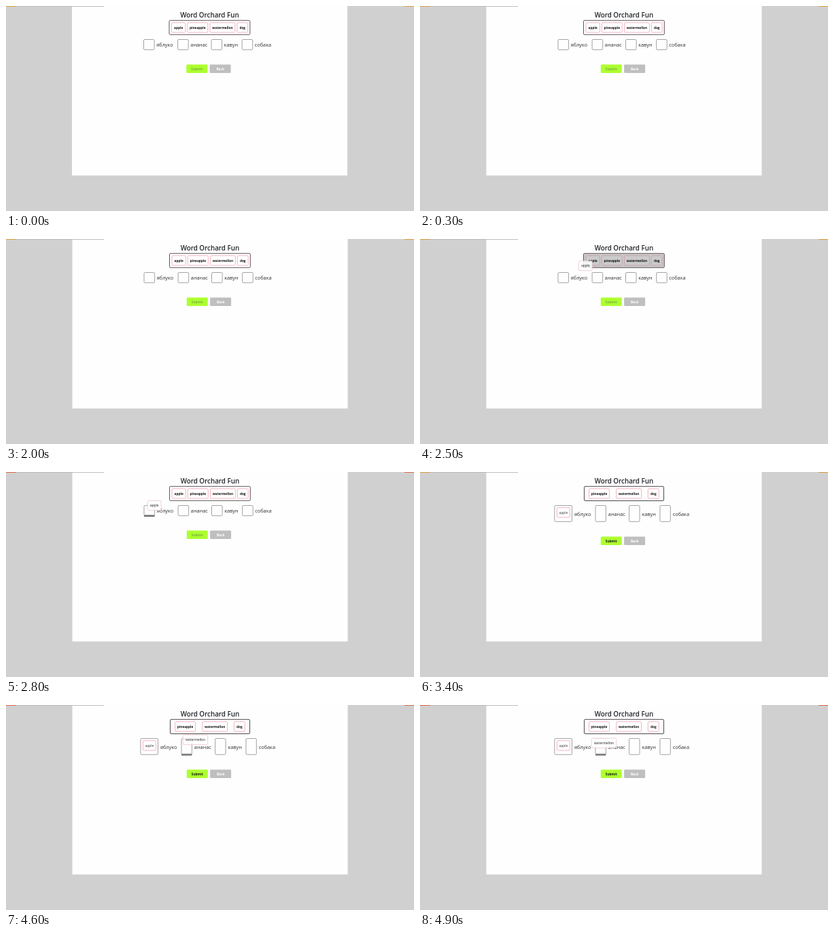
An HTML page with a canvas that plays this animation: 600x303 px, repeating every 5000 ms.

```html
<!DOCTYPE html>
<html lang="uk">
<head>
<meta charset="utf-8">
<title>Word matching</title>
<style>
html, body { margin: 0; width: 100%; height: 100%; overflow: hidden; background: #d0d0d0; }
canvas { display: block; }
</style>
</head>
<body>
<canvas id="stage" width="600" height="303"></canvas>
<script>
const ctx = document.getElementById('stage').getContext('2d');
const LOOP = 5000;
const STEP = 100;
const FONT = '"Open Sans", "Noto Sans", sans-serif';
const PINK = '#eea3b1';
const WORDS = ['яблуко', 'ананас', 'кавун', 'собака'];

function box(x, y, w, h, fill, stroke, radius = 1.5, line = 0.8) {
  ctx.beginPath();
  ctx.roundRect(x, y, w, h, radius);
  if (fill) {
    ctx.fillStyle = fill;
    ctx.fill();
  }
  if (stroke) {
    ctx.strokeStyle = stroke;
    ctx.lineWidth = line;
    ctx.stroke();
  }
}

function rect(x, y, w, h, color) {
  ctx.fillStyle = color;
  ctx.fillRect(x, y, w, h);
}

function text(str, x, y, size, weight, color, align = 'left') {
  ctx.font = `${weight} ${size}px ${FONT}`;
  ctx.textAlign = align;
  ctx.fillStyle = color;
  ctx.fillText(str, x, y);
}

function tag(word, x, y, w, { fill = '#fff', color = '#151515', weight = 700, border = PINK } = {}) {
  box(x, y, w, 14.3, fill, border);
  text(word, x + w / 2, y + 8.9, 4.75, weight, color, 'center');
}

function ghost(word, x, y, w) {
  ctx.globalAlpha = 0.82;
  tag(word, x, y, w, { color: '#2c2c2c', weight: 600, border: '#e3b9c0' });
  ctx.globalAlpha = 1;
}

function slot(x, w, h, hover) {
  box(x, 49.5, w, h, '#fefefe', '#8c8c8c', 1.5);
  if (hover) {
    rect(x + 0.5, 47.5 + h, w - 1, 1.5, '#c8c8c8');
    rect(x, 49 + h, w, 1.7, '#555');
  }
}

function button(label, x, y, fill, color) {
  box(x, y, 31, 12.5, fill, null, 1.3);
  text(label, x + 15.5, y + 8.1, 4.75, 700, color, 'center');
}

function buttons(dx, y, submitColor) {
  button('Submit', 265.3 + dx, y, '#adff2f', submitColor);
  button('Back', 299.6 + dx, y, '#bfbfbf', '#fff');
}

// Fraction of the drag path covered, fast at first
function glide(t, start, length) {
  const u = Math.min(1, Math.max(0, (t - start) / length));
  return 1 - (1 - u) ** 2;
}

function page(dx, alert) {
  rect(0, 0, 600, 303, '#d0d0d0');
  rect(97 + dx, 0, 405, 250.5, '#fefefe');
  rect(15, 0, 129, 1, '#bdbdbd');
  const accent = alert ? '#df6a42' : '#dfa040';
  rect(0, 0, 15, 1, accent);
  rect(586, 0, 14, 1, accent);
  text('Word Orchard Fun', 299.4 + dx, 16.7, 9.8, 600, '#212529', 'center');
}

function before(t, dx) {
  const dragging = t >= 2500;
  const p = glide(t, 2500, 500);
  const lifted = dragging && p === 0;
  ctx.save();
  ctx.translate(dx, 0);
  box(240, 21.3, 118.8, 21, lifted ? '#c9c9c9' : '#fefefe', '#615458', 1.5, 1);
  const style = lifted ? { fill: '#cbcbcb', border: '#c99ba4' } : {};
  tag('apple', 243.5, 24.7, 20.3, style);
  tag('pineapple', 266.8, 24.7, 30, style);
  tag('watermellon', 300, 24.7, 36.8, style);
  tag('dog', 339.8, 24.7, 15.8, style);
  [202.5, 252.6, 302, 347.1].forEach((x, i) => {
    slot(x, 15.6, 15.2, i === 0 && dragging && p > 0.6);
    text(WORDS[i], x + 18.7, 60.2, 7.35, 400, '#2b2f33');
  });
  buttons(0, 86.5, '#78b13a');
  ctx.restore();
  if (dragging) ghost('apple', 233.3 - 30 * p, 32.3 + 12 * p, 20);
}

function after(t) {
  const dragging = t >= 4300;
  const p = glide(t, 4300, 600);
  const lifted = dragging && p === 0;
  box(241.5, 21.3, 117, 21.2, '#fefefe', '#4f4a4c', 1.5, 1);
  tag('pineapple', 248.6, 24.7, 30, {});
  tag('watermellon', 288.7, 24.7, 36.8, lifted ? { fill: '#d6d6d6', color: '#888' } : {});
  if (lifted) rect(289, 38.6, 36.5, 1.3, '#555');
  tag('dog', 335.3, 24.7, 16, {});
  const slots = [[197.9, 25.6], [258, 15.4], [307.6, 15.4], [352.9, 15.4]];
  slots.forEach(([x, w], i) => {
    slot(x, w, 23.8, i === 1 && dragging && p > 0.6);
    text(WORDS[i], x + w + 3.4, 64.6, 7.35, 400, '#2b2f33');
  });
  tag('apple', 201.4, 52.7, 19, { weight: 400, color: '#333' });
  buttons(0.5, 95.6, t < 3400 ? '#466b20' : '#10180a');
  if (dragging) ghost('watermellon', 284 - 31.7 * p, 29.7 + 19.4 * p, 36.5);
}

function draw(now) {
  const t = Math.floor((now % LOOP) / STEP) * STEP;
  const dx = t < 300 ? 0 : 0.5;
  page(dx, (t >= 2600 && t < 3300) || t >= 4300);
  if (t < 3300) before(t, dx);
  else after(t);
}

const start = performance.now();
function tick() {
  draw(performance.now() - start);
  requestAnimationFrame(tick);
}
tick();
</script>
</body>
</html>
```
